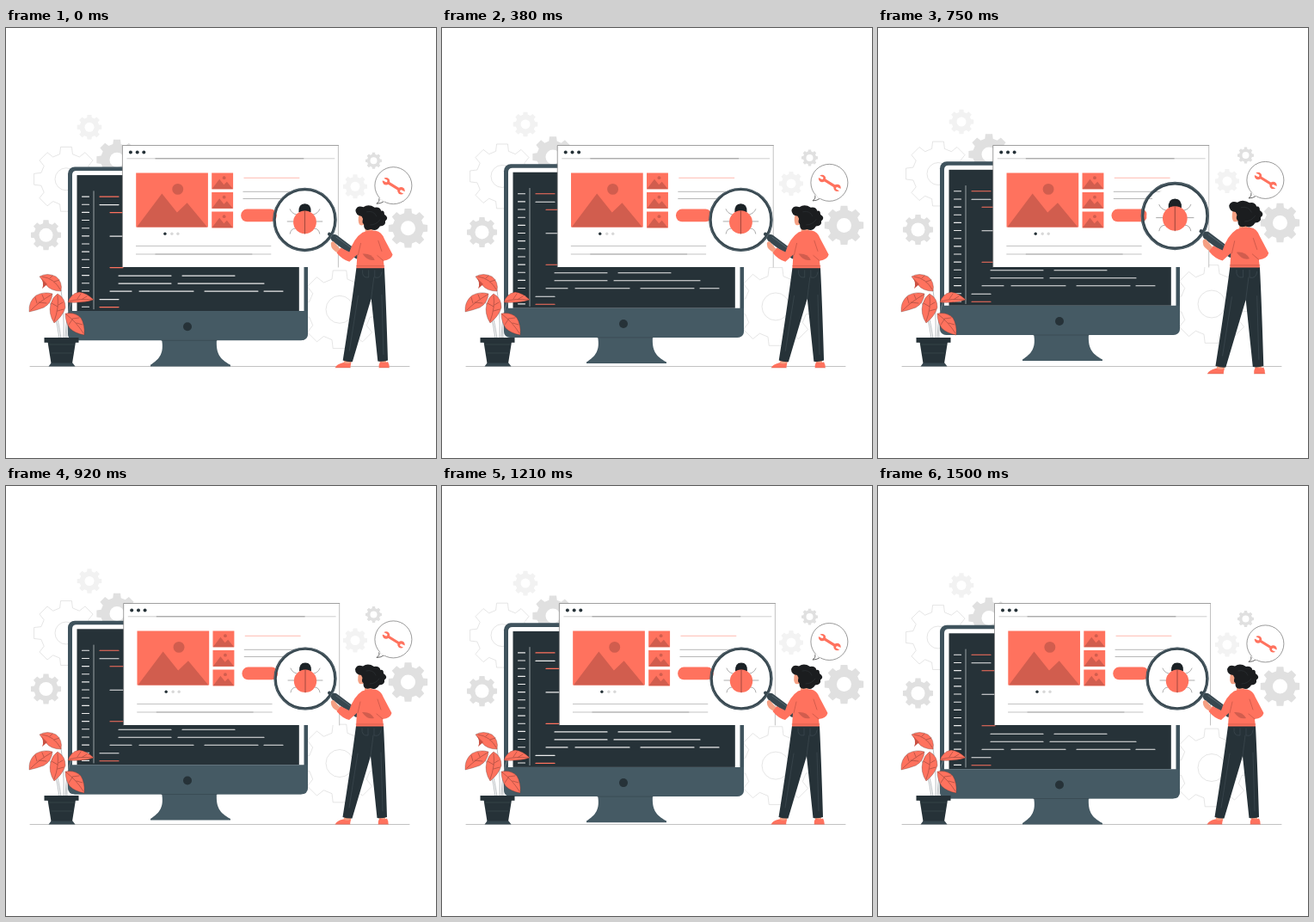
An HTML page that plays this animation: 500x500 px, repeating every 1540 ms.

```html
<!DOCTYPE html>
<html lang="en">
<head>
<meta charset="utf-8">
<style>
html, body { margin: 0; height: 100%; overflow: hidden; background: #fff; }
svg { display: block; width: 100vw; height: 100vh; }
.line { fill: none; stroke-linecap: round; }
</style>
</head>
<body>
<svg id="stage" viewBox="0 0 500 500"></svg>
<script>
const CORAL = '#ff725e', DEEP = '#d15d4e', DARK = '#263238', SLATE = '#455a64', SKIN = '#f5a083';

const path = (d, fill, extra = '') => `<path d="${d}" fill="${fill}" ${extra}/>`;
const line = (d, color = DARK, width = 0.6) =>
  `<path class="line" d="${d}" stroke="${color}" stroke-width="${width}"/>`;
const circle = (x, y, r, fill, extra = '') =>
  `<circle cx="${x}" cy="${y}" r="${r}" fill="${fill}" ${extra}/>`;
const rect = (x, y, w, h, fill, extra = '') =>
  `<rect x="${x}" y="${y}" width="${w}" height="${h}" fill="${fill}" ${extra}/>`;
const group = (id, ...parts) => `<g id="${id}">${parts.join('')}</g>`;

function gear(x, y, r, hole, fill, extra = '') {
  const points = [];
  for (let tooth = 0; tooth < 8; tooth++) {
    for (const [offset, radius] of [[-0.25, 0.79], [-0.17, 1], [0.17, 1], [0.25, 0.79]]) {
      const a = tooth * Math.PI / 4 + offset;
      points.push((x + r * radius * Math.cos(a)).toFixed(2) + ' ' + (y + r * radius * Math.sin(a)).toFixed(2));
    }
  }
  return path(`M${points.join('L')}Z`, fill, extra + ' stroke-linejoin="round"') +
    circle(x, y, hole, '#fff', extra);
}

function gears() {
  const outline = 'stroke="#d4d4d4" stroke-width=".6"';
  return gear(70, 176, 38, 13, '#fff', outline) + gear(388, 327.5, 46, 16, '#fff', outline) +
    gear(97, 115.5, 14.5, 5.5, '#f2f2f2') + gear(129, 153.5, 24, 8.5, '#e0e0e0') +
    gear(46.5, 241, 17.8, 8, '#e0e0e0') + gear(427.5, 154.5, 9.6, 4, '#e0e0e0') +
    gear(406, 184.5, 14.2, 5.5, '#f3f3f3') + gear(467.5, 233, 23, 8.5, '#e0e0e0');
}

function code() {
  let out = line('M102 190V327', '#b9c0c3', 0.8);
  for (let row = 0; row < 15; row++) out += line(`M88.5 ${196.3 + row * 9.15}h8`, '#ededed', 1.1);
  const rows = [
    [196, 1, 109, 131], [205.5, 0, 109, 131], [214.5, 1, 121, 136], [242, 0, 121, 136], [278.5, 1, 121, 136],
    [288, 0, 131, 192], [288, 0, 205, 266], [297, 0, 131, 192], [297, 0, 200, 300],
    [306, 0, 121, 146], [306, 0, 155, 218], [306, 0, 231, 293], [306, 0, 300, 322],
    [315.5, 0, 109, 131], [324.5, 1, 109, 131]
  ];
  for (const [y, accent, from, to] of rows) out += line(`M${from} ${y + 0.3}H${to}`, accent ? CORAL : '#ededed', 1.1);
  return out;
}

function monitor() {
  return path('M181 362H245C244 378 248 385 261 392V393.600H168V392C179 385 184 378 181 362Z', SLATE) +
    rect(72, 161.7, 279, 201.5, '#3f535d', 'rx="8"') +
    path('M77 330V171Q77 166.300 82 166.300H341.500Q346.500 166.300 346.500 171V330Z', '#fff') +
    rect(82.5, 171.3, 258.3, 158, DARK) +
    path('M72 329.300H351V355.500Q351 363.500 343 363.500H80Q72 363.500 72 355.500Z', SLATE) +
    line('M181 363.5H245', '#37474f', 0.7) + circle(211, 347.5, 5, DARK) + code();
}

function bubble() {
  return path('M434 198Q435 202 431 204.500Q436 204.500 440 201.500Z', '#fff', 'stroke="#555" stroke-width=".9"') +
    circle(450.4, 183.4, 21.5, '#fff', 'stroke="#555" stroke-width=".6"') +
    line('M434.600 198.300L439.500 201.500', '#fff', 1.2) +
    line('M443.500 179.500L458 188.500', CORAL, 3.2) +
    circle(442, 178.5, 4.2, CORAL) + circle(459.5, 189.4, 4.2, CORAL) +
    line('M442 178L437 175.500M459.500 190L464.500 192.500', '#fff', 2.8);
}

function picture(x, y, w, h) {
  const p = (a, b) => `${x + a * w} ${y + b * h}`;
  return rect(x, y, w, h, CORAL) +
    path(`M${p(0.01, 1)}L${p(0.36, 0.38)}L${p(0.57, 0.73)}L${p(0.71, 0.55)}L${p(0.99, 1)}Z`, DEEP) +
    circle(x + w * 0.58, y + h * 0.3, w * 0.077, DEEP);
}

function browser() {
  const dots = [145, 152.8, 160.4].map(x => circle(x, 144.4, 2, DARK)).join('');
  const pager = [185, 193, 200].map((x, i) => circle(x, 239.2, 1.7, i ? '#d8d8d8' : DARK)).join('');
  const thumbs = [168.5, 191, 213.5].map(y => picture(239.3, y, 24.9, 18.8)).join('');
  return rect(135.5, 136.5, 251, 141.5, '#fff') +
    line('M135.500 278V136.500H386.500', '#777', 0.7) + line('M386.500 136.500V278', '#999', 0.6) + dots +
    line('M141 151.800H382', '#aaa', 0.6) + line('M174 151.800H346', '#555', 0.5) +
    picture(151.3, 168.5, 83.7, 63) + thumbs + pager +
    line('M151.500 253.500H308M151.500 263H308', '#aaa', 0.7) + line('M174 263H286', '#777', 0.5) +
    line('M277 174.300H341', '#ff9d8f', 0.7) + line('M276 190.300H337M276 198.500H323', '#999', 0.7) +
    rect(273.3, 210.6, 41.5, 14.6, CORAL, 'rx="7"');
}

function magnifier() {
  const legs = 'M338 218Q333 217 331 212M358 218Q363 217 365 212M335 226H328M361 226H368' +
    'M337 234Q332 234 331 240M359 234Q364 234 365 240';
  return line('M376 240.500L383 245.500', '#37474f', 4) +
    line('M382 245L408 264.500', '#37474f', 8.5) + line('M384 244L409 262', '#607079', 0.7) +
    circle(348, 224, 30.5, '#fff') +
    circle(348, 224, 34.9, 'none', 'stroke="#37474f" stroke-width="3.4"') +
    circle(348, 224, 35.8, 'none', 'stroke="#71818a" stroke-width=".5"') +
    line(legs, '#777', 0.6) +
    path('M341 215.500Q340.500 205.600 348 205.600Q355.500 205.600 355 215.500Z', '#1b2226') +
    circle(348, 226.8, 13.2, CORAL) + line('M348 214V240', '#7d3931', 0.7);
}

function person() {
  return magnifier() +
    path('M394 383L402 385L400 390L392 389ZM433 382H441V389H434Z', SKIN) +
    path('M383 393.300Q384 389.500 392 387.500Q397 390 401 387.500L400 393.300ZM433 393.300Q432 389 435 386.500Q439 388.500 443 386.500Q445 390 444.500 393.300Z', CORAL) +
    line('M383 393.200H400M433 393.200H444.500', '#d15d4e', 0.5) +
    path('M407 279H439Q441 318 443 385Q437 387 431.500 386L424 314L402.500 386.500Q397 387 391.500 385Q401 325 407 279Z', DARK) +
    line('M414 282Q413 291 421 290V282M428 282V290Q435 292 436 284M409 311L399 374M424 314L427 290M436 310L438 378', '#46535a', 0.5) +
    path('M410 218Q408 227 411 230Q414 231 417 229L417 240L426 240L424 216Z', SKIN) +
    path('M388 257L381 249Q377 249 378 253Q378 258 386 262Z', SKIN) +
    path('M414 238.500Q421 235.500 429 236.500Q436 237.500 439 246L448.500 264Q447 270 438 271L439 279.500H407L408 264L399 272Q391 270 384.500 262L389 256L399 261Q404 245 414 238.500Z', CORAL) +
    path('M414 263Q424 262 428 270Q420 272 414 263Z', DEEP) +
    line('M409 264L412 251M438 271L431 265M407 277H439M432 248L436 260', '#a8463a', 0.5) +
    path('M413 220Q406 219 406 213Q408 207 415 209.500Q421 205.500 428 210Q434 209 435.500 214Q439 213 439 218Q445 222 440 225.500Q441 231 434 231.500Q430 238 424 235Q415 238 415.500 229Q413 228 414.500 223Z', '#1b1d1f') +
    line('M419 215Q427 213 430 220M423 230Q430 230 434 224', '#33393c', 0.5);
}

function plant() {
  const leaf = (d, veins) => path(d, CORAL, 'stroke="#5d332e" stroke-width=".35"') + line(veins, '#7c3b33', 0.5);
  return line('M64 361Q60 335 59 338M67 361Q68 330 64 305M62 361Q58 330 50 318M69 361Q70 330 76 319M71 361Q70 345 74 338', '#8b9499', 0.6) +
    leaf('M39 289Q48 284 58 289Q66 295 64 306Q52 306 46 298Z', 'M42 289Q56 291 63 304M51 291L54 288M56 295L62 293') +
    path('M40 290L48 298L42 303Q45 296 40 290Z', '#c95143') +
    leaf('M27 330Q26 318 35 311Q44 306 54 309Q53 320 44 325Q36 328 27 330Z', 'M29 328Q39 318 53 310M36 320L34 313M38 319L47 320M44 315L42 310') +
    leaf('M60 309Q69 314 69 325Q66 335 56 343Q49 332 52 321Q54 313 60 309Z', 'M60 311Q62 325 56 341M61 322L66 319M60 329L67 327M60 324L53 320') +
    leaf('M72 319Q75 309 85 307Q94 308 102 316Q90 320 72 319Z', 'M73 318Q86 314 100 316M83 315L87 309M89 315L94 312') +
    leaf('M69 332Q80 330 87 337Q92 345 91 357Q80 355 74 349Q69 342 69 332Z', 'M70 333Q82 342 90 355M77 338L85 337M82 343L89 345M77 339L73 345') +
    rect(44.5, 360, 40, 5.8, DARK) + path('M48.500 365H81L77 390H52.500Z', DARK) +
    line('M50 368H79M53 378H77', '#435057', 0.5) +
    path('M52.500 389.500H77.500L80.500 393.500H49.500Z', '#37474f');
}

document.getElementById('stage').innerHTML =
  group('backdrop', gears()) +
  line('M28 393.500H469', '#999', 0.6) +
  group('monitor', monitor()) + group('bubble', bubble()) +
  group('browser', browser()) + plant() + group('person', person());

const LOOP = 1540, CYCLE = 1500, STEP = 1000 / 24, LEAD = 24;
const BEAT = [[0, 1], [0.1, 1.1], [0.3, 1], [0.4, 1], [0.5, 1.1], [0.6, 1], [1, 1]];
const SHAKE = [0, -1, 2, -4, 4, -4, 4, -4, 2, -1, 0].map((x, i) => [i / 10, x * 0.65]);
const FLOAT = [[0, 0], [0.5, -6.7], [1, 0]];

function valueAt(keys, u) {
  const i = Math.max(1, keys.findIndex(key => key[0] >= u));
  const [u0, a] = keys[i - 1], [u1, b] = keys[i];
  return a + (b - a) * (u - u0) / (u1 - u0);
}

const move = (id, transform) => document.getElementById(id).setAttribute('transform', transform);

function draw(now) {
  // The motion advances at 24 steps per second.
  const time = Math.min(36, Math.floor((now % LOOP + 5) / STEP)) * STEP;
  const u = Math.min(1, (time + LEAD) / CYCLE);
  const lift = `translate(0 ${valueAt(FLOAT, u)})`;
  for (const id of ['backdrop', 'monitor', 'bubble']) move(id, lift);
  move('browser', `translate(${valueAt(SHAKE, u)} 0)`);
  move('person', `translate(380 290) scale(${valueAt(BEAT, u)}) translate(-380 -290)`);
}

let start;
function tick(now) {
  start ??= now;
  draw(now - start);
  requestAnimationFrame(tick);
}
draw(0);
requestAnimationFrame(tick);
</script>
</body>
</html>
```
